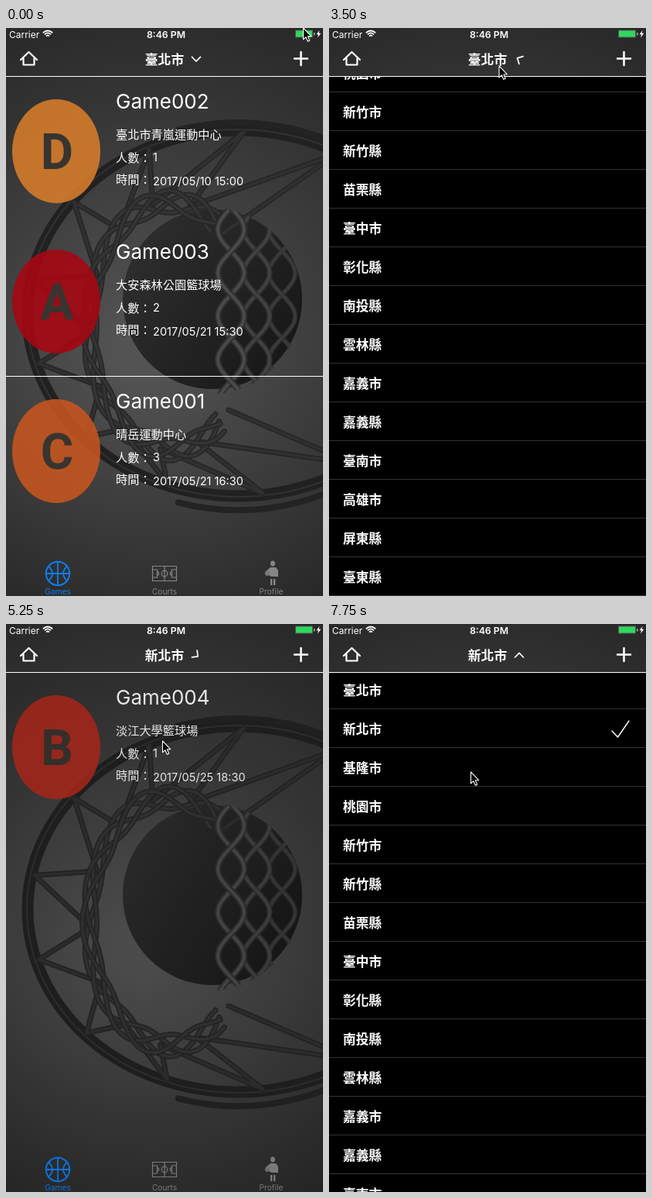
Recreate the animation shown at these times as an HTML page with a canvas. Size 410 by 733 pixels, loop 8000 ms.

```html
<!DOCTYPE html>
<html lang="zh-Hant">
<head>
<meta charset="utf-8">
<title>Games</title>
<style>
html, body { margin: 0; width: 100%; height: 100%; overflow: hidden; background: #000; }
canvas { display: block; width: 410px; height: 733px; }
</style>
</head>
<body>
<canvas id="stage"></canvas>
<script>
const W = 410, H = 733, LOOP = 8000, STEP = 250, TOP = 63, ROW = 50;
const LATIN = 'Inter, Roboto, sans-serif';
const CJK = '"Noto Sans CJK TC", "Noto Sans CJK", sans-serif';
const TAU = Math.PI * 2;
const dpr = window.devicePixelRatio || 1;

const cities = ('臺北市 新北市 基隆市 桃園市 新竹市 新竹縣 苗栗縣 臺中市 彰化縣 南投縣 雲林縣 ' +
  '嘉義市 嘉義縣 臺南市 高雄市 屏東縣 臺東縣 花蓮縣 宜蘭縣 澎湖縣 金門縣 連江縣').split(' ');

const taipei = [
  { name: 'Game002', place: '臺北市青嵐運動中心', count: 1, date: '2017/05/10 15:00', mark: 'D', color: '#d97d2b' },
  { name: 'Game003', place: '大安森林公園籃球場', count: 2, date: '2017/05/21 15:30', mark: 'A', color: '#a80612' },
  { name: 'Game001', place: '晴岳運動中心', count: 3, date: '2017/05/21 16:30', mark: 'C', color: '#c8561e' }
];
const newTaipei = [
  { name: 'Game004', place: '淡江大學籃球場', count: 1, date: '2017/05/25 18:30', mark: 'B', color: '#b52a1c' }
];

// places where the pointer rests or turns
const stops = [
  { t: 0, x: 384, y: -1 }, { t: 500, x: 378, y: 50 }, { t: 1500, x: 373, y: 40 },
  { t: 1750, x: 222, y: 26 }, { t: 2000, x: 219, y: 42 }, { t: 3250, x: 219, y: 42 },
  { t: 3750, x: 223, y: 91 }, { t: 4250, x: 202, y: 150 }, { t: 5250, x: 202, y: 150 },
  { t: 5750, x: 383, y: 92 }, { t: 6250, x: 202, y: 43 }, { t: 6500, x: 211, y: 41 },
  { t: 7000, x: 211, y: 41 }, { t: 7750, x: 183, y: 190 }
];

const icons = {
  home: new Path2D('M19 41 29.5 31 40 41M22.5 39V47.5H36.5V39'),
  plus: new Path2D('M373 39.5H390M381.5 31V48'),
  bolt: new Path2D('M405.5 3 401.5 8.3H404L403 12.5 407.3 6.8H404.6Z'),
  check: new Path2D('M366 28 373.5 36 388 15'),
  chevron: new Path2D('M-5.5-2.8 0 2.8 5.5-2.8'),
  arrow: new Path2D('M0 0V15L3.4 11.9 5.8 17.4 8.2 16.4 5.9 11 10.2 10.8Z'),
  ball: new Path2D('M67 689V719M52 704H82M55 694.5Q65 704 55 713.5M79 694.5Q69 704 79 713.5'),
  court: new Path2D('M189.5 694.5H220.5V713.5H189.5ZM205 695V713' +
    'M190 699H195.5V709H190M220 699H214.5V709H220M195.5 701Q200 704 195.5 707M214.5 701Q210 704 214.5 707'),
  player: new Path2D('M342 696H349L352 700V708H343L340 706 335 705V702Z')
};

function makeCanvas(el) {
  el.width = W * dpr;
  el.height = H * dpr;
  const c = el.getContext('2d');
  c.scale(dpr, dpr);
  c.lineCap = c.lineJoin = 'round';
  return c;
}

const photo = document.createElement('canvas');
let g = makeCanvas(photo);
drawPhoto();
g = makeCanvas(document.getElementById('stage'));

function stroke(path, color, width) {
  g.strokeStyle = color;
  g.lineWidth = width;
  g.stroke(path);
}

function fill(path, color) {
  g.fillStyle = color;
  g.fill(path);
}

function oval(x, y, rx, ry = rx, from = 0, to = TAU) {
  const path = new Path2D();
  path.ellipse(x, y, rx, ry, 0, from, to);
  return path;
}

function rect(x, y, w, h, color) {
  g.fillStyle = color;
  g.fillRect(x, y, w, h);
}

function text(str, x, y, font, color = '#fff', align = 'left') {
  g.font = font;
  g.textAlign = align;
  g.fillStyle = color;
  g.fillText(str, x, y);
}

function rope(points, width, dark, light) {
  const path = new Path2D();
  points.forEach(p => path.lineTo(...p));
  stroke(path, dark, width);
  stroke(path, light, width * 0.5);
}

function drawPhoto() {
  const glow = g.createRadialGradient(175, 420, 30, 195, 370, 430);
  glow.addColorStop(0, '#535353');
  glow.addColorStop(0.5, '#3c3c3c');
  glow.addColorStop(1, '#272727');
  rect(0, 0, W, H, glow);

  // hoop and its bracket
  stroke(oval(300, 368, 272, 236), '#212121', 15);
  stroke(oval(300, 368, 273, 237), '#323232', 2);
  stroke(oval(300, 372, 280, 250, -1.85, 1.85), '#232323', 8);

  const skin = g.createLinearGradient(160, 280, 390, 420);
  skin.addColorStop(0, '#2e2e2e');
  skin.addColorStop(0.6, '#202020');
  skin.addColorStop(1, '#161616');
  fill(oval(267, 350, 116), skin);

  // ropes from the hoop to the inner ring
  const onRim = a => [300 + 268 * Math.cos(a), 368 + 234 * Math.sin(a)];
  const onRing = (a, r = 1) => [212 + 104 * r * Math.cos(a), 384 + 160 * r * Math.sin(a)];
  for (let i = -1; i < 9; i++) {
    const a = 1.45 + i * 0.47;
    rope([onRing(a - 0.23), onRim(a), onRing(a + 0.23)], 7, '#262626', '#303030');
  }

  // loose braid around the ball
  for (let k = 0; k < 4; k++) {
    const points = [];
    for (let a = 0.9; a < 5.3; a += 0.05) {
      points.push(onRing(a, 1 + 0.09 * Math.sin(a * 5 + k * 1.6)));
    }
    rope(points, 7, '#272727', '#343434');
  }

  // open mesh over the ball
  g.save();
  g.clip(oval(262, 352, 121));
  for (let k = 2; k >= 0; k--) {
    const light = `hsl(0 0% ${29 - k * 3}%)`;
    for (const side of [-1, 1]) {
      const points = [];
      for (let y = 232; y < 474; y += 4) {
        points.push([291 + k * 33 + side * 17 * Math.sin((y - 232) / 56 * Math.PI), y]);
      }
      rope(points, 8 - k, '#303030', light);
    }
  }
  g.restore();
}

function drawGame(game, i) {
  const y = Math.round(i * 193.5);
  g.globalAlpha = 0.88;
  fill(oval(65, 159 + y, 57, 67), game.color);
  g.globalAlpha = 1;
  text(game.mark, 66, 181.5 + y, '600 65px Roboto, sans-serif', '#38342f', 'center');
  text(game.name, 142, 103.5 + y, `400 26px ${LATIN}`);
  const cjk = `400 15.2px ${CJK}`, num = `400 14.6px ${LATIN}`;
  text(game.place, 142, 142.8 + y, cjk);
  text('人數：', 142, 172.5 + y, cjk);
  text(game.count, 190, 172.3 + y, num);
  text('時間：', 142, 200.5 + y, cjk);
  text(game.date, 190, 203.3 + y, num);
}

function drawTabs() {
  const blue = '#0d7ef0', grey = '#868686';
  stroke(oval(67, 704, 15.2), blue, 2);
  stroke(icons.ball, blue, 1.8);

  stroke(icons.court, grey, 1.2);
  stroke(oval(205, 704, 3.8), grey, 1.2);

  fill(oval(345, 691, 3, 3.5), grey);
  fill(icons.player, grey);
  fill(oval(338, 704, 3), '#777');
  for (const x of [342, 346]) rect(x, 711, 2.4, 8, grey);

  ['Games', 'Courts', 'Profile'].forEach((label, i) =>
    text(label, 67 + i * 138, 731, `400 10.2px ${LATIN}`, i ? grey : blue, 'center'));
}

function drawHeader(city, angle) {
  g.drawImage(photo, 0, 0, W * dpr, TOP * dpr, 0, 0, W, TOP);
  rect(0, 62, W, 1, '#fff');

  text('Carrier', 4, 13, `400 12px ${LATIN}`);
  for (const r of [2, 5, 8]) stroke(oval(54, 11.5, r, r, -2.35, -0.8), '#fff', 1.8);
  text('8:46 PM', 207, 13, `600 12.3px ${LATIN}`, '#fff', 'center');
  rect(374, 2.5, 23, 10, '#555');
  rect(375, 3.5, 21, 8, '#2fd85c');
  rect(398, 6, 1.5, 3.5, '#aaa');
  fill(icons.bolt, '#fff');

  stroke(icons.home, '#fff', 2.2);
  stroke(icons.plus, '#fff', 2.5);
  text(city, 205, 46.5, `700 16.8px ${CJK}`, '#fff', 'center');
  g.save();
  g.translate(246, 40.2);
  g.rotate(angle);
  stroke(icons.chevron, '#fff', 1.7);
  g.restore();
}

function drawMenu(offset, checked, pressed) {
  const top = 62 + offset;
  const rule = offset > 5 ? '#fff' : offset < 0 ? '#333' : '#888';
  g.save();
  g.beginPath();
  g.rect(0, TOP, W, H - TOP);
  g.clip();
  rect(0, TOP, W, top + cities.length * ROW - TOP, '#000');
  cities.forEach((city, i) => {
    const y = top + i * ROW, hit = i === pressed;
    if (hit) rect(0, y - 1, W, ROW + 1, '#fff');
    text(city, 18, y + 32, `700 16.8px ${CJK}`, hit ? '#555' : '#fff');
    rect(0, y + 49, W, 1, hit ? '#fff' : rule);
  });
  g.translate(0, top + checked * ROW);
  if (checked >= 0) stroke(icons.check, '#fff', 1.4);
  g.restore();
}

function drawPointer(t) {
  const i = stops.findLastIndex(s => s.t <= t);
  const from = stops[i], to = stops[i + 1] || from;
  const p = ((t - from.t) / (to.t - from.t || 1)) ** 3;
  g.save();
  g.translate(from.x + (to.x - from.x) * p + 0.5, from.y + (to.y - from.y) * p + 0.8);
  fill(icons.arrow, '#000');
  stroke(icons.arrow, '#fff', 1.1);
  g.restore();
}

const clamp = v => Math.min(1, Math.max(0, v));
const ease = v => { v = clamp(v); return v * v * (3 - 2 * v); };

// underdamped spring: leaves 1 at rest, settles to 0 in about 0.75 s
function spring(ms) {
  const s = ms / 1000;
  return Math.exp(-9.2 * s) * (Math.cos(9.4 * s) + 0.98 * Math.sin(9.4 * s));
}

function draw(t) {
  const opened = t >= 7000 ? 7130 : 3320, chosen = 5000, closed = chosen + STEP;
  const city = t < chosen ? 0 : 1;
  const pressing = t >= chosen && t < closed;
  const menu = t >= opened && (t < closed || t >= 7000);
  const turns = ease((t - 3210) / 480) + ease((t - 4980) / 420) + ease((t - 7050) / 450);

  g.drawImage(photo, 0, 0, W, H);
  (city ? newTaipei : taipei).forEach(drawGame);
  if (!city) rect(0, 449, W, 1, '#fff');
  drawTabs();

  const shade = menu ? clamp((t - opened) / 400) : city * (1 - ease((t - 4980) / 440));
  rect(0, TOP, W, H - TOP, `rgba(0,0,0,${0.3 * shade})`);
  if (menu) {
    const offset = Math.round(-cities.length * ROW * spring(t - opened));
    drawMenu(offset, pressing ? -1 : city, pressing ? 1 : -1);
  }
  drawHeader(cities[city], turns * Math.PI);
  drawPointer(t);
}

const start = performance.now();
function frame() {
  const t = (performance.now() - start) % LOOP;
  draw(Math.floor(t / STEP) * STEP);
  requestAnimationFrame(frame);
}
frame();
</script>
</body>
</html>
```
